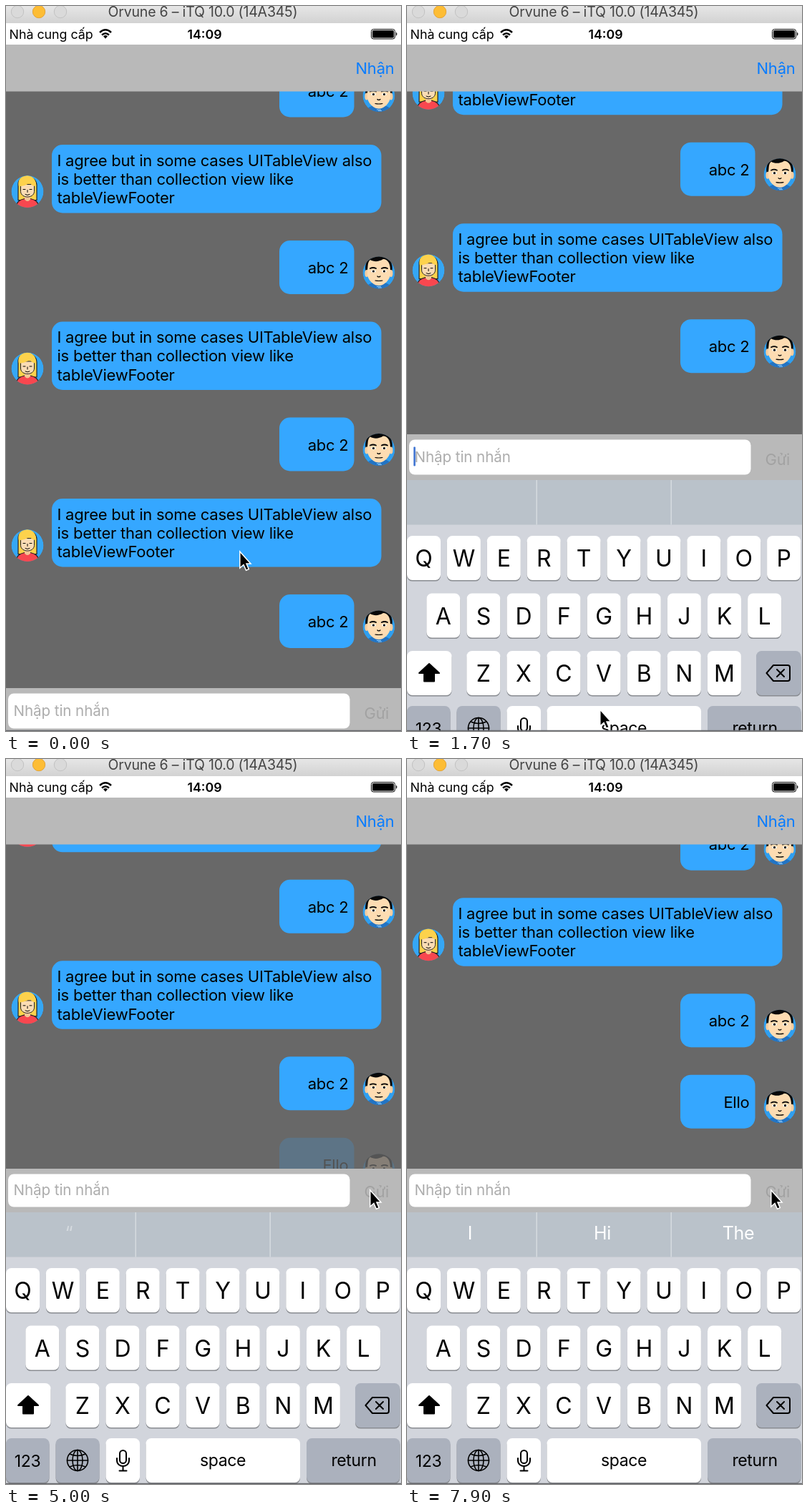
These frames come from a looping animation (552 by 1014 pixels, 8000 ms). An HTML page:

```html
<!DOCTYPE html>
<html lang="vi">
<head>
<meta charset="utf-8">
<title>Chat</title>
<style>
  html, body { margin: 0; width: 100%; height: 100%; overflow: hidden; background: #686868; }
  svg { display: block; width: 552px; height: 1014px; }
  text { font-family: Inter, Roboto, sans-serif; white-space: pre; }
  .body { font-size: 22px; letter-spacing: -.011em; }
  .input { font-size: 20.6px; letter-spacing: -.004em; }
  .status { font-size: 17.8px; }
  .label { font-size: 23px; letter-spacing: -.016em; text-anchor: middle; }
  .upper { font-size: 32px; text-anchor: middle; }
  .lower { font-size: 36px; font-weight: 300; text-anchor: middle; }
  .hint { letter-spacing: -.01em; text-anchor: middle; }
  .line { fill: none; stroke: #000; stroke-width: 2; stroke-linejoin: round; stroke-linecap: round; }
</style>
</head>
<body>
<svg id="stage" viewBox="0 0 552 1014" xmlns="http://www.w3.org/2000/svg"></svg>
<script>
const LOOP = 8000, STEP = 100, SENT = 4900;
const stage = document.getElementById('stage');
const $ = id => document.getElementById(id);

const rect = (x, y, w, h, fill, r = 0, extra = '') =>
  `<rect x="${x}" y="${y}" width="${w}" height="${h}" rx="${r}" fill="${fill}" ${extra}/>`;
const text = (x, y, cls, str, extra = '') =>
  `<text x="${x}" y="${y}" class="${cls}" ${extra}>${str}</text>`;
const group = (id, content, extra = '') => `<g id="${id}" ${extra}>${content}</g>`;

// Avatars, drawn around their own centre
const defs = `<defs>
  <clipPath id="disc"><circle r="22.5"/></clipPath>
  <clipPath id="list"><rect y="119" width="552" height="895"/></clipPath>
  <linearGradient id="chrome" x2="0" y2="1">
    <stop stop-color="#e6e6e6"/><stop offset="1" stop-color="#d2d2d2"/>
  </linearGradient>
  <g id="woman" clip-path="url(#disc)">
    <circle r="22.5" fill="#35a7f5"/>
    <path d="M-13 12V-9C-14-25 12-25 13-9V12Z" fill="#fdd24c" stroke="#222" stroke-width="1.2"/>
    <path d="M-16 24C-16 13-9 11-4 10H4C9 11 16 13 16 24Z" fill="#f8474f" stroke="#222" stroke-width="1.2"/>
    <path d="M-4 5V11Q0 16 4 11V5Z" fill="#f3c695"/>
    <path d="M-9.5-10H9.5V0C9 10-9 10-9.5 0Z" fill="#fbdcb4" stroke="#222" stroke-width="1"/>
    <path d="M-12-7C-4-8 1-10 3-13C5-9 8-8 12-7C13-19 4-23-2-22C-11-21-14-15-12-7Z" fill="#fdd24c"/>
    <path d="M-6-3H-3M3-3H6M0-2V1M-3 4Q0 6 3 4" class="line" style="stroke-width:1"/>
  </g>
  <g id="man" clip-path="url(#disc)">
    <circle r="22.5" fill="#2f9ff0"/>
    <path d="M-19 24C-17 15-8 13 0 13S17 15 19 24Z" fill="#2274c4"/>
    <path d="M-18 1C-21-13-16-23 0-23C16-23 21-13 18 1Z" fill="#080808"/>
    <ellipse cx="-17" cy="1" rx="2.6" ry="5" fill="#f4cda0"/>
    <ellipse cx="17" cy="1" rx="2.6" ry="5" fill="#f4cda0"/>
    <path d="M-16-4C-15-9-16-15-12-18C-7-15 0-15 6-19C13-19 16-12 16-4V3C15 10 8 18 0 18S-15 10-16 3Z" fill="#fddcb2"/>
    <path d="M-12-6Q-8-8-4-6M4-6Q8-8 12-6" class="line" style="stroke-width:1.8"/>
    <ellipse cx="-7.5" cy="-2" rx="3.2" ry="1.7" fill="#fff"/><ellipse cx="7.5" cy="-2" rx="3.2" ry="1.7" fill="#fff"/>
    <circle cx="-7.5" cy="-2" r="1.6"/><circle cx="7.5" cy="-2" r="1.6"/>
    <path d="M-2 5Q0 7 2 5M-5 11Q0 12 5 11" class="line" style="stroke-width:1.2"/>
    <path d="M-3 19.5H3M-1 21H4" stroke="#8ec8f5" stroke-width="1"/>
  </g></defs>`;

const LINES = ['I agree but in some cases UITableView also', 'is better than collection view like', 'tableViewFooter'];
const received = y => rect(64, y, 460.5, 95.5, '#35a7ff', 15) +
  LINES.map((s, i) => text(71.5, y + 29.5 + i * 26.4, 'body', s)).join('') +
  `<use href="#woman" x="30" y="${y + 65.5}"/>`;
const sent = (y, str) => rect(382, y, 104.5, 75, '#35a7ff', 15) +
  text(478.5, y + 46, 'body', str, 'text-anchor="end"') +
  `<use href="#man" x="521" y="${y + 45}"/>`;

const rows = [0, 1, 2, 3].map(i => received(-53.5 + 247.5 * i) + sent(80.5 + 247.5 * i, 'abc 2')).join('');
const chat = `<g clip-path="url(#list)">${group('rows', rows + group('reply', sent(936.5, 'Ello')))}</g>`;

const light = (x, fill, line) => `<circle cx="${x}" cy="8" r="8.7" fill="${fill}" stroke="${line}"/>`;
const header = rect(0, 0, 552, 24, 'url(#chrome)') +
  light(16, '#dadada', '#c2c2c2') + light(46, '#fdbd35', '#e2a43a') + light(76, '#dadada', '#c2c2c2') +
  text(275, 15, '', 'Orvune 6 – iTQ 10.0 (14A345)', 'font-size="19.5" letter-spacing="-.2" fill="#444" text-anchor="middle"') +
  rect(0, 24, 552, 30, '#fff') + text(4.5, 45.5, 'status', 'Nhà cung cấp') +
  text(277.5, 45.5, 'status', '14:09', 'font-weight="600" text-anchor="middle"') +
  `<path d="M131 37Q139 29.5 147 37M134 40.5Q139 36 144 40.5" class="line" style="stroke-width:2.4;stroke-linecap:butt"/>
   <path d="M136 42.2Q139 39.8 142 42.2L139 45.8Z"/>` +
  rect(510.5, 32.5, 33, 13.5, '#fff', 3, 'stroke="#000"') + rect(512, 34, 30, 10.5, '#000', 1.5) +
  '<path d="M545 36.5Q548 39 545 42Z"/>' +
  rect(0, 54, 552, 65.5, '#b9b9b9') + text(542.5, 95, 'body', 'Nhận', 'fill="#087cff" text-anchor="end"');

// Composer: y is measured from its lower edge
const composer = rect(0, -64, 552, 64, '#b9b9b9', 0, 'id="bar"') + rect(3, -57, 477.5, 49, '#fff', 8, 'id="field"') +
  group('entry', rect(7.5, -14, 38.5, 28, '#cfe0f1', 0, 'id="mark"') +
    text(10.5, 7, 'input', 'Nhập tin nhắn', 'id="hold" fill="#adadad"') +
    text(10.5, 7, 'input', '', 'id="typed"') + rect(9.5, -14, 2.6, 27, '#3e73d2', 1, 'id="caret"')) +
  text(500.5, -21, 'body', 'Gửi', 'id="send"');

// Keyboard: y is measured from the top of the suggestion strip
const GREY = '#abb1bd';
const key = (x, y, w, fill = '#fff', id = '') =>
  rect(x, y + 1.6, w, 62, '#898c91', 7.5) + rect(x, y, w, 62, fill, 7.5, id && `id="${id}"`);
const letters = [['QWERTYUIOP', 0, 78, 55.9], ['ASDFGHJKL', 27.3, 158.5, 56.1], ['ZXCVBNM', 83.3, 239, 56.1]];
const eachLetter = draw => letters.map(([row, x, y, pitch]) =>
  [...row].map((c, i) => draw(c, x + i * pitch, y)).join('')).join('');
const arrow = 'M31 257L45 270H38V281.5H24V270H17Z';

const keyboard = rect(0, 0, 552, 400, '#d2d5dc') + rect(0, 0, 552, 62.5, '#bac2ca') +
  rect(180.5, 0, 1.4, 62.5, '#d8dde2') + rect(368.5, 0, 1.4, 62.5, '#d8dde2') +
  rect(180.5, 0, 189, 62.5, '#e9eaef', 0, 'id="pick"') +
  [0, 1, 2].map(i => text(0, 37.5, 'hint', '', `id="hint${i}"`)).join('') +
  eachLetter((c, x, y) => key(x, y, 47)) +
  group('caps', eachLetter((c, x, y) => text(x + 23.5, y + 43, 'upper', c))) +
  group('small', eachLetter((c, x, y) => text(x + 23.5, y + 41.5, 'lower', c.toLowerCase()))) +
  key(0, 239, 62.5, GREY, 'shift') + `<path id="arrow" d="${arrow}" class="line"/>` +
  key(488, 239, 62.5, GREY) +
  '<path d="M502.5 270L512 259H532Q535 259 535 262V278Q535 281 532 281H512ZM517 265L527 275M527 265L517 275" class="line"/>' +
  key(0, 316, 60.5, GREY) + key(69.5, 316, 61, GREY) + key(139.5, 316, 47.5) + key(195.5, 316, 215.5) + key(420, 316, 130.5, GREY) +
  text(30, 356, 'label', '123') + text(303, 355, 'label', 'space') + text(486, 355, 'label', 'return') +
  `<g class="line" style="stroke-width:1.6"><circle cx="100" cy="347" r="14.5"/><ellipse cx="100" cy="347" rx="7" ry="14.5"/>
   <path d="M100 332.5V361.5M85.5 347H114.5M89 338Q100 343 111 338M89 356Q100 351 111 356"/></g>
   <g class="line">${rect(159, 333, 9, 18, 'none', 4.5)}<path d="M155 344V347C155 357.5 172 357.5 172 347V344M163.5 355V361M158.5 361.5H168.5"/></g>`;

const pointer = '<path id="pointer" d="M.8 1V24L6 19.5L9.5 27.3L13.3 25.7L10 18H16Z" fill="#000" stroke="#fff" stroke-width="1.5"/>';

stage.innerHTML = defs + rect(0, 0, 552, 1014, '#686868') + chat + header +
  group('composer', composer) + group('keyboard', keyboard) + rect(0, 1012.8, 552, 1.2, '#63656a') + pointer;

// Tables of [time, value...]
const RISE = [[1400, 1018], [1500, 945], [1600, 775], [1700, 663], [1800, 638], [1900, 634]];
const POINTER = [[200, 326, 762], [800, 269, 983], [3900, 269, 983], [4300, 412, 640], [4600, 508, 602]];
const TYPING = [[0, ''], [2700, 'E'], [2800, 'El'], [2900, 'Ell'], [3100, 'Ello'], [SENT, '']];
const HINTS = [
  [0, ['', '', ''], 0, 20, [88, 275, 463]],
  [2800, ['“', 'E', 'E'], .35, 20, [73, 252, 441]],
  [2900, ['“Ell”', 'Ell', 'Elle'], .6, 25, [88, 275, 463]],
  [3300, ['“Ello”', 'Dovu', 'Ellipses'], 1, 25, [88, 275, 463]],
  [SENT, ['“', '', ''], .4, 25, [88, 275, 463]],
  [5200, ['“', 'Hi', 'The'], .6, 25, [87, 272, 463]],
  [5300, ['I', 'Hi', 'The'], 1, 25, [88, 273, 463]]
];
const CARET = [1500, 2700, 3200, 5100];

const latest = (table, t) => table.filter(row => row[0] <= t).pop();
const smooth = p => (1 - Math.cos(Math.PI * p)) / 2;
const clamp = p => Math.min(1, Math.max(0, p));

function track(table, t, col = 1, ease = p => p) {
  const i = table.findIndex(row => row[0] > t);
  if (i === 0) return table[0][col];
  if (i < 0) return table[table.length - 1][col];
  const a = table[i - 1], b = table[i];
  return a[col] + (b[col] - a[col]) * ease((t - a[0]) / (b[0] - a[0]));
}

const set = (id, attrs) => Object.entries(attrs).forEach(([k, v]) => $(id).setAttribute(k, v));
const show = (id, on) => $(id).style.visibility = on ? 'visible' : 'hidden';
const move = (id, x, y) => set(id, { transform: `translate(${x} ${y})` });

function render(t) {
  const top = track(RISE, t);
  const word = latest(TYPING, t)[1];
  const height = word ? 69 : t >= SENT ? 61 : 64;
  const slide = smooth(clamp((t - SENT) / 340));
  move('rows', 0, -(t >= 1500 ? 384.8 : 0) - 110 * slide);
  set('reply', { opacity: slide });

  move('composer', 0, top);
  move('keyboard', 0, top);
  set('bar', { y: -height, height });
  set('field', { y: 7.5 - height, height: height - 15 });
  move('entry', 0, -height / 2 - 0.5);
  $('typed').textContent = word;
  show('hold', !word);
  set('send', { fill: word ? '#087cff' : '#a2a2a2' });

  const correcting = t >= 3300 && t < SENT;
  show('mark', correcting);
  show('pick', correcting);
  const since = CARET.filter(s => s <= t).pop();
  show('caret', since !== undefined && (t - since) % 1000 < 550);
  set('caret', { x: 9.2 + (word ? $('typed').getComputedTextLength() : 0) });

  const [, words, alpha, size, xs] = latest(HINTS, t);
  words.forEach((w, i) => {
    $('hint' + i).textContent = w;
    set('hint' + i, { x: xs[i], opacity: alpha, 'font-size': size, fill: correcting && i === 1 ? '#2272d9' : '#fff' });
  });

  const caps = !word;
  show('caps', caps);
  show('small', !caps);
  set('shift', { fill: caps ? '#fff' : GREY });
  $('arrow').style.fill = caps ? '#000' : 'none';
  move('pointer', track(POINTER, t, 1, smooth), track(POINTER, t, 2, smooth));
}

const start = performance.now();
function tick() {
  const t = (performance.now() - start) % LOOP;
  render(Math.floor(t / STEP) * STEP);
  requestAnimationFrame(tick);
}
tick();
</script>
</body>
</html>
```
